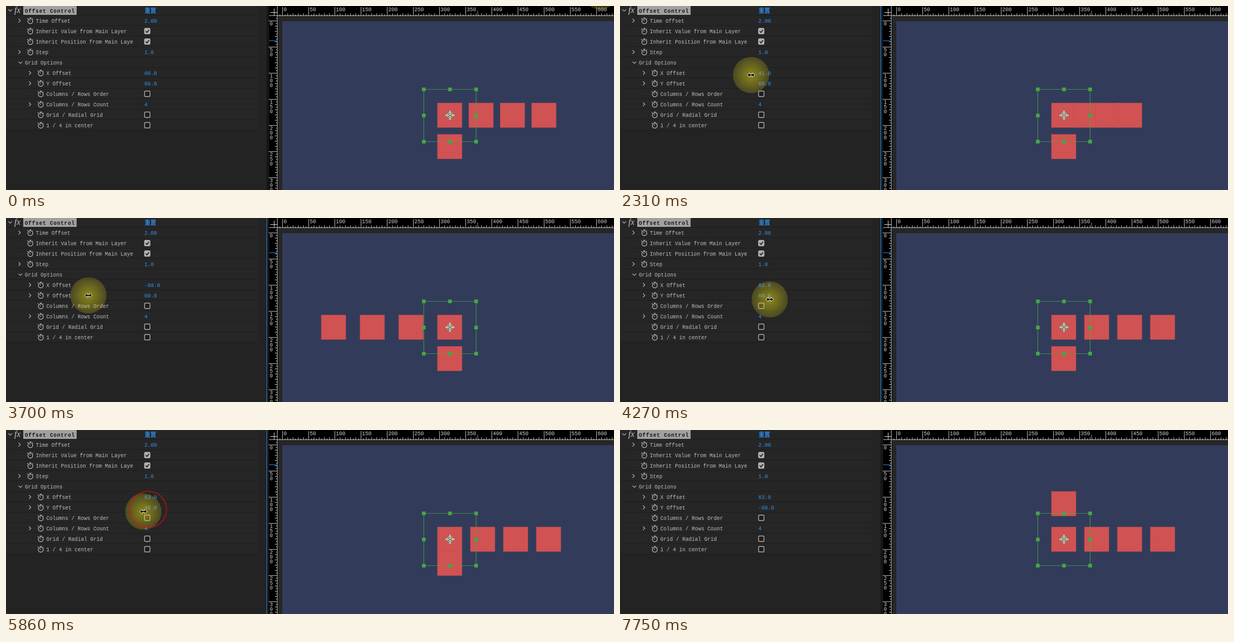
An HTML page that plays this animation: 1162 by 352 pixels, repeating every 7.88 s.

```html
<!DOCTYPE html>
<html lang="en">
<head>
<meta charset="utf-8">
<title>Offset Control</title>
<style>
  html, body { margin: 0; width: 100%; height: 100%; overflow: hidden; background: #232323; }
  svg { display: block; width: 1162px; height: 352px; }
  text { font: 10px "Liberation Mono", "DejaVu Sans Mono", monospace; white-space: pre; }
  .label { fill: #bebebe; }
  .value { fill: #3294f4; }
  .title { font-weight: bold; letter-spacing: .85px; fill: #161616; }
  .reset { font: bold 11px "Noto Sans CJK SC", "Noto Sans CJK", sans-serif; fill: #2d8ceb; }
  .fx { font: italic 16px "Liberation Serif", serif; fill: #c8c8c8; }
  .tick { fill: #d0d0d0; }
</style>
</head>
<body>
<svg id="stage" viewBox="0 0 1162 352">
  <defs>
    <radialGradient id="glow">
      <stop offset="0" stop-color="#e4da10" stop-opacity=".54"/>
      <stop offset=".5" stop-color="#d6cd14" stop-opacity=".4"/>
      <stop offset="1" stop-color="#c8c01c" stop-opacity=".23"/>
    </radialGradient>
  </defs>
  <rect width="1162" height="352" fill="#232323"/>
  <g id="panel"></g>
  <rect x="498" width="5" height="352" fill="#161616"/>
  <rect id="focus" x="498" width="1" height="352" fill="#2d8ceb"/>
  <rect x="503" width="659" height="352" fill="#262626"/>
  <rect x="528" y="29" width="634" height="323" fill="#323c5a"/>
  <g id="squares" fill="#d15252" stroke="#8c4a58" stroke-opacity=".25" stroke-width=".5"></g>
  <g id="frame"></g>
  <g id="rulers"></g>
  <circle id="halo" r="34.6" fill="url(#glow)"/>
  <circle id="ring" fill="none" stroke="#f00808" stroke-width="2.6"/>
  <g id="pointer">
    <path id="scrub" d="M-6.5 0L-2.5-3.5V-1H2.5V-3.5L6.5 0L2.5 3.5V1H-2.5V3.5Z"
      fill="#000" stroke="#fff" stroke-width="1.6" paint-order="stroke" stroke-linejoin="round"/>
    <path id="arrow" d="M0 0V15L3.5 11.8L6 17.5L8.3 16.5L5.8 11H10.5Z" fill="#fff" stroke="#000"/>
  </g>
</svg>
<script>
const LOOP = 7880;
const $ = id => document.getElementById(id);

function add(parent, tag, attrs, text) {
  const el = document.createElementNS('http://www.w3.org/2000/svg', tag);
  for (const k in attrs) el.setAttribute(k, attrs[k]);
  if (text !== undefined) el.textContent = text;
  parent.appendChild(el);
  return el;
}
const set = (el, attrs) => { for (const k in attrs) el.setAttribute(k, attrs[k]); };
const show = (el, on) => set(el, { visibility: on ? 'visible' : 'hidden' });

// ---- Effect panel ----
const panel = $('panel');
const write = (x, y, cls, s) => add(panel, 'text', { x, y, class: cls }, s);
const stroke = (d, width = 1.2, color = '#b0b0b0') =>
  add(panel, 'path', { d, fill: 'none', stroke: color, 'stroke-width': width });

function chevron(x, y, open) {
  stroke(open ? `M${x - 3.5} ${y - 1.5}l3.5 3.5l3.5-3.5` : `M${x - 2} ${y - 3.5}l3.5 3.5l-3.5 3.5`);
}
function stopwatch(x, y) {
  add(panel, 'circle', { cx: x + .5, cy: y + 1, r: 4.7, fill: 'none', stroke: '#c0c0c0', 'stroke-width': 1.3 });
  stroke(`M${x - 1.5} ${y - 5.5}h4M${x + .5} ${y - 5.5}v2M${x + .5} ${y + 1}l-2-2.5M${x - 5.5} ${y - 4.5}l2 1.5M${x + 4} ${y - 3}l1.5-1`);
}
function checkbox(y, on) {
  add(panel, 'rect', { x: 264.8, y: y - 5.2, width: 10.4, height: 10.4, rx: 2,
    fill: on ? '#b0b0b0' : '#1e1e1e', stroke: '#b0b0b0', 'stroke-width': 1.4 });
  if (on) stroke(`M267 ${y}l2.4 2.6l4-5`, 1.7, '#202020');
}

// [label, value (string or checked flag), nesting level]
const rows = [
  ['Time Offset', '2.00', 0],
  ['Inherit Value from Main Layer', true, 0],
  ['Inherit Position from Main Laye', true, 0],
  ['Step', '1.0', 0],
  ['Grid Options'],
  ['X Offset', '60.0', 1],
  ['Y Offset', '60.0', 1],
  ['Columns / Rows Order', false, 1],
  ['Columns / Rows Count', '4', 1],
  ['Grid / Radial Grid', false, 1],
  ['1 / 4 in center', false, 1]
];
const values = {};

for (let i = 0; i < 12; i++) {
  add(panel, 'rect', { y: i * 20 - 2, width: 481, height: 19, fill: '#262626' });
  add(panel, 'rect', { y: i * 20 + 17, width: 481, height: 1, fill: '#1d1d1d' });
}
chevron(8, 8, true);
write(16, 13, 'fx', 'fx');
add(panel, 'rect', { x: 33, y: 0, width: 102, height: 17, fill: '#a0a0a0' });
write(36, 12.5, 'title', 'Offset Control');
write(265, 12.5, 'reset', '重置');

rows.forEach(([name, value, level], i) => {
  const y = 28 + i * 20;
  if (level === undefined) {
    chevron(27.5, y, true);
    write(36, y + 3.5, 'label', name);
    return;
  }
  const x = 26 + level * 20;
  const isText = typeof value === 'string';
  if (isText) chevron(x, y);
  else add(panel, 'rect', { x: x - .5, y, width: 1, height: 1, fill: '#4a4a4a' });
  stopwatch(x + 20, y);
  write(x + 31, y + 3.5, 'label', name);
  if (isText) values[name] = write(264.5, y + 4, 'value', value);
  else checkbox(y, value);
});

// ---- Rulers ----
const rulers = $('rulers');
add(rulers, 'rect', { x: 503, width: 659, height: 19, fill: '#000' });
add(rulers, 'rect', { x: 503, width: 17, height: 352, fill: '#000' });
let ticks = 'M503 18.5H1162M518.5 0V352';
const tickLength = n => n % 50 === 0 ? 16 : n % 10 === 0 ? 4 : 2;
for (let n = -5; n < 635; n += 5) {
  const size = tickLength(n);
  ticks += `M${528.5 + n} 18v${-size}`;
  if (n < 325) ticks += `M518 ${28.5 + n}h${-size}`;
}
add(rulers, 'path', { d: ticks, stroke: '#c4c4c4', fill: 'none' });
for (let n = 0; n <= 600; n += 50) {
  add(rulers, 'text', { x: 530.5 + n, y: 10, class: 'tick' }, n);
  if (n <= 300) [...String(n)].forEach((digit, k) =>
    add(rulers, 'text', { x: 504, y: 36.5 + n + k * 9, class: 'tick' }, digit));
}
add(rulers, 'rect', { x: 503, width: 15, height: 18, fill: '#000' });
add(rulers, 'path', { d: 'M505 12.5H519M512.5 5V18', stroke: '#e0e0e0' });
add(rulers, 'path', { d: 'M503 66.5H519', stroke: '#2d8ceb' });
add(rulers, 'path', { d: 'M901.5 9V18', stroke: '#909090' });

// ---- Squares and selection ----
const squares = Array.from({ length: 5 }, () =>
  add($('squares'), 'rect', { width: 47.2, height: 47.2 }));

const frame = $('frame');
add(frame, 'rect', { x: 798.5, y: 159.5, width: 100, height: 100, fill: 'none', stroke: '#49a849',
  'stroke-width': 1.2, 'stroke-dasharray': '1.5 .5' });
for (const x of [798, 848, 898]) for (const y of [159, 209, 259]) {
  if (x !== 848 || y !== 209)
    add(frame, 'rect', { x: x - 3, y: y - 3, width: 7, height: 7, fill: '#45a545' });
}
const anchorMark = 'M843 209a5.5 5.5 0 1 0 11 0a5.5 5.5 0 1 0-11 0M846 209a2.5 2.5 0 1 0 5 0a2.5 2.5 0 1 0-5 0' +
  'M848.5 200.5v5M848.5 212.5v5M840 209h5M852 209h5M846.5 201h4M846.5 217h4M840.5 207v4M856.5 207v4';
for (const [color, width] of [['#3f4a40', 2.6], ['#e6e6cc', 1.3]])
  add(frame, 'path', { d: anchorMark, fill: 'none', stroke: color, 'stroke-width': width });

// ---- Motion: time, x, y of the pointer ----
const path = [
  [0, 1135, -28], [140, 1010, 10], [350, 560, 85], [560, 285, 126], [660, 265, 128], [740, 265, 128],
  [830, 277, 128], [890, 278, 128], [1100, 260, 128], [1400, 288, 122], [1660, 275, 126], [1800, 269, 130],
  [1900, 269, 130], [2250, 251, 132], [2310, 250, 132], [2730, 212, 133], [3080, 166, 140],
  [3430, 141, 148], [3560, 141, 148], [3645, 151, 148], [3700, 157, 148], [4120, 289, 149],
  [4190, 289, 149], [4500, 276, 175], [4760, 262, 164], [5020, 272, 152], [5270, 272, 152],
  [5470, 283, 53], [5650, 284, 120], [5800, 262, 156], [5860, 262, 156], [6200, 226, 147],
  [6710, 170, 158], [6850, 154, 162], [6920, 154, 162], [7130, 185, 94], [7200, 1135, -90]
];
const drags = [{ start: 700, end: 4150, x: 265, y: 128 }, { start: 5260, end: 6900, x: 272, y: 152 }];
const [dragX, dragY] = drags;
const LAG = 55;   // the comp view trails the numbers
const anchors = [0, 890, 1960, 3630, 4270, 5090, 5930, 6780, 7750];

function pointer(t) {
  const i = path.findIndex(p => p[0] > t);
  if (i < 0) return path[path.length - 1].slice(1);
  const [t0, x0, y0] = path[i - 1], [t1, x1, y1] = path[i];
  const k = (t - t0) / (t1 - t0);
  return [x0 + (x1 - x0) * k, y0 + (y1 - y0) * k];
}

// Right and up raise the value, one unit per pixel.
function scrubbed(drag, t) {
  if (t <= drag.start) return 60;
  const [x, y] = pointer(Math.min(t, drag.end));
  return Math.min(97, Math.round(60 + x - drag.x - (y - drag.y)));
}

function hold(t) {
  const start = anchors.filter(a => a <= t).pop();
  return start + Math.floor((t - start) / 70) * 70;
}

function draw(time) {
  const t = hold(time);
  const [px, py] = pointer(t);
  values['X Offset'].textContent = scrubbed(dragX, t).toFixed(1);
  values['Y Offset'].textContent = scrubbed(dragY, t).toFixed(1);

  const dx = scrubbed(dragX, t - LAG), dy = scrubbed(dragY, t - LAG);
  squares.forEach((s, i) => set(s, { x: 824.4 + (i % 4) * dx, y: 185.4 + (i > 3 ? dy : 0) }));

  show($('focus'), t >= 700 && t < 7750);
  set($('halo'), { cx: px + .5, cy: py });
  set($('pointer'), { transform: `translate(${px + .5} ${py})` });
  const scrubbing = t >= 560 && t < 6920;
  show($('scrub'), scrubbing);
  show($('arrow'), !scrubbing);

  const press = drags.find(d => t >= d.start && t < d.start + 750);
  show($('ring'), press);
  if (press) {
    const age = t - press.start;
    set($('ring'), { cx: press.x, cy: press.y, r: age * .058, opacity: 1 - (age / 850) ** 2 });
  }
}

const begin = performance.now();
function tick() {
  draw((performance.now() - begin) % LOOP);
  requestAnimationFrame(tick);
}
tick();
</script>
</body>
</html>
```
